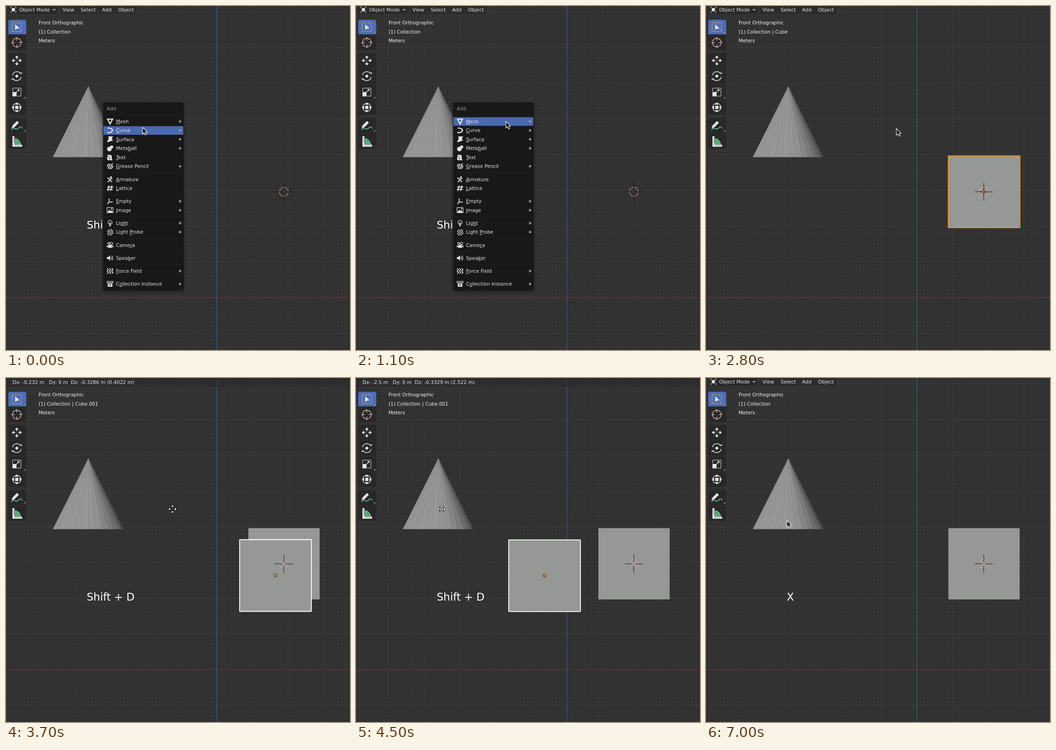
An HTML page for the animation above (7.2 s loop, 748 px wide and 748 px high).

```html
<!DOCTYPE html>
<html lang="en">
<head>
<meta charset="utf-8">
<title>Add, duplicate, delete</title>
<style>
html, body { margin: 0; width: 100%; height: 100%; overflow: hidden; background: #313131; }
svg { display: block; width: 100vw; height: 100vh; }
text { font: 10.5px "DejaVu Sans", sans-serif; fill: #e4e4e4; white-space: pre; }
.head text { font-size: 10.6px; }
.info text { font-size: 10.4px; fill: #f2f2f2; }
.keys text { font-size: 23px; fill: #fff; }
.dim { fill: #9a9a9a; }
.u { text-decoration: underline; text-decoration-thickness: 1px; text-underline-offset: 2px; }
.menu { filter: drop-shadow(0 2px 3px rgba(0, 0, 0, .45)); }
.panel { fill: #181818; fill-opacity: .97; }
.hi { fill: #4a69af; }
.icon { fill: none; stroke: #e4e4e4; stroke-width: 1.2; }
.icon .f { fill: #e4e4e4; stroke: none; }
.icon .k { fill: #181818; stroke: none; }
.tool { fill: #282828; }
.corner { fill: #888; }
</style>
</head>
<body>
<svg id="stage" viewBox="0 0 748 748" xmlns="http://www.w3.org/2000/svg">
  <rect width="748" height="748" fill="#313131"/>
  <path id="minor" stroke="#363636"/>
  <path id="major" stroke="#3f3f3f"/>
  <path d="M0 633.5H748" stroke="#853447"/>
  <path d="M458.5 0V748" stroke="#2f62a9" stroke-width="1.3"/>
  <g id="cone"></g>

  <g id="cube"><rect x="527" y="326.5" width="155" height="155" fill="#969896"/></g>
  <rect id="cubeLine" x="526.7" y="326" width="156" height="156" rx="1" fill="none" stroke="#f5920d" stroke-width="1.8"/>
  <g id="copy">
    <rect id="copyBox" x="-78" y="-78" width="156" height="156" rx="1" fill="#969896" stroke-width="1.8"/>
    <circle r="3" fill="#f09a1c" stroke="#111"/>
  </g>
  <g transform="translate(604 404)" fill="none">
    <circle r="9.6" stroke="#e8dcd8"/>
    <circle r="9.6" stroke="#c8402f" stroke-dasharray="3.77"/>
    <path d="M-19.5 0H-4.5M4.5 0H19.5M0-19.5V-4.5M0 4.5V19.5" stroke="#111"/>
    <g id="cubeDot"><path d="M-6 0H6M0-6V6" stroke="#111"/><circle r="3" fill="#f08a2c" stroke="#111"/></g>
  </g>

  <g class="head" id="head">
    <rect x="6" y="-6" width="105" height="23" rx="4" fill="#282828"/>
    <rect x="118" y="-6" width="166" height="23" rx="4" fill="#2c2c2c"/>
    <rect x="12.5" y="4.5" width="7" height="7" fill="#e4e4e4"/>
    <path d="M10 5V2H13M19 2H22V5M22 11V14H19M13 14H10V11" fill="none" stroke="#ccc"/>
    <path d="M101.500 6.500L104.500 9.500L107.500 6.500" fill="none" stroke="#ccc" stroke-width="1.3"/>
    <text x="28.500" y="12">Object Mode</text><text x="123" y="12">View</text>
    <text x="162.500" y="12">Select</text><text x="209" y="12">Add</text><text x="243.500" y="12">Object</text>
  </g>
  <g class="head" id="move"><rect width="748" height="19" fill="#292929" opacity=".6"/><text id="delta" x="14" y="13"></text></g>
  <g class="info"><text x="71" y="40.300">Front Orthographic</text><text id="label" x="71" y="59.800"></text><text x="71" y="79.300">Meters</text></g>

  <g id="tools">
    <path class="tool" d="M9 30H40Q44 30 44 34V92Q44 96 40 96H9Q5 96 5 92V34Q5 30 9 30ZM9 102H40Q44 102 44 106V233Q44 237 40 237H9Q5 237 5 233V106Q5 102 9 102ZM9 244H40Q44 244 44 248V307Q44 311 40 311H9Q5 311 5 307V248Q5 244 9 244Z"/>
    <path d="M5 62.500H44M5 135.500H44M5 169.500H44M5 203.500H44M5 277.500H44" stroke="#313131"/>
    <path d="M9 30H40Q44 30 44 34V61.500H5V34Q5 30 9 30Z" fill="#4c6fb6"/>
    <rect x="13.500" y="36.500" width="20" height="19" fill="none" stroke="#eba53c" stroke-width="1.500" stroke-dasharray="4 2.500"/>
    <path d="M20 40V52L23 49.500L29.500 48.500Z" fill="#eee"/>
    <g fill="none" transform="translate(23.500 79.500)">
      <circle r="9.500" stroke="#eee" stroke-width="1.400"/>
      <circle r="9.500" stroke="#c9443c" stroke-width="1.400" stroke-dasharray="3.730"/>
      <path d="M-12 0H-4M4 0H12M0-12V-4M0 4V12" stroke="#ddd"/>
    </g>
    <g fill="#e4e4e4" stroke="#e4e4e4" transform="translate(23.500 118.500)">
      <path d="M-8 0H-3M3 0H8M0-8V-3M0 3V8" stroke-width="1.600"/>
      <path stroke="none" d="M0-11L4-6H-4ZM0 11L4 6H-4ZM-11 0L-6-4V4ZM11 0L6-4V4Z"/>
    </g>
    <g fill="none" stroke="#e4e4e4" stroke-width="1.500" transform="translate(23.500 152.500)">
      <path d="M-9.500-2A9.700 9.700 0 0 1 8-5.500M9.500 2A9.700 9.700 0 0 1-8 5.500"/>
      <path d="M0-4L4 0L0 4L-4 0ZM6-5H11V-9ZM-6 5H-11V9Z" fill="#e4e4e4" stroke="none"/>
    </g>
    <path d="M15 178.500H32.500V196H24M14.500 186V178.500" fill="none" stroke="#ddd"/>
    <path d="M14 187H23V196.500H14Z" fill="#e4e4e4"/><path d="M23 187L28 182M25 181.500H28.500V185" fill="none" stroke="#e4e4e4" stroke-width="1.500"/>
    <g transform="translate(23.500 220.500)" fill="#e4e4e4">
      <circle r="9" fill="none" stroke="#ddd" stroke-width="1.300"/><path d="M-3.500-3.500H3.500V3.500H-3.500Z"/>
      <path d="M0-11L4-6H-4ZM0 11L4 6H-4ZM-11 0L-6-4V4ZM11 0L6-4V4Z"/>
    </g>
    <path d="M12 270C17 260 22 272 27 266S33 264 36 266" fill="none" stroke="#69c88b" stroke-width="1.500"/>
    <path d="M12 266L14 260L24 250L28 254L18 264Z" fill="#e4e4e4"/>
    <path d="M20 288A14 14 0 0 1 32 301H20Z" fill="#56a779" stroke="#7bd39f"/>
    <path d="M14 283H18.500V301.500H35V306H14Z" fill="#e4e4e4"/>
    <path d="M16 287H18M16 291H18M16 295H18M22 304V302M26 304V302M30 304V302" stroke="#444"/>
    <path class="corner" d="M42 56V60H38ZM42 197V201H38ZM42 269V273H38Z"/>
  </g>

  <g class="keys"><text id="key1" x="175.500"></text><text id="key2" x="175.500" y="484.300">X</text></g>
  <g class="menu" id="add"></g>
  <g class="menu" id="mesh"></g>
  <g class="menu" id="curve"></g>
  <g class="menu" id="ask">
    <rect class="panel" x="97" y="268.500" width="175" height="54.500" rx="4"/>
    <path d="M98 296.500H271" stroke="#202020"/>
    <rect class="hi" x="98" y="301" width="173" height="18.700"/>
    <circle cx="110.500" cy="282.500" r="6.500" fill="none" stroke="#aaa"/>
    <text class="dim" x="107.700" y="286.500">?</text><text class="dim" x="128.500" y="286">OK?</text>
    <text x="125" y="314.200"><tspan class="u">D</tspan>elete</text><text class="dim" x="259.500" y="314.200">X</text>
  </g>
  <path id="arrow" d="M0 0V14.500L3.400 11.300L5.800 16.500L8.400 15.300L6 10.300H10.300Z" fill="#0c0c0c" stroke="#fff" stroke-width="1.100" stroke-linejoin="round"/>
  <path id="cross" d="M0-9L4-4.500H-4ZM0 9L4 4.500H-4ZM-9 0L-4.500-4V4ZM9 0L4.500-4V4Z" fill="#fff" stroke="#111" stroke-width="1"/>
</svg>
<script>
const LOOP = 7200, STEP = 100, UNIT = 77.6, ROW = 19.5, GAP = 8.7;
const $ = id => document.getElementById(id);
const path = (d, extra = '') => `<path d="${d}" ${extra}/>`;
const solid = d => path(d, 'class="f"');
const dot = (x, y, r, cls = '') => `<circle cx="${x}" cy="${y}" r="${r}" class="${cls}"/>`;

const icons = {
  mesh: path('M-5.500-5H5.500L0 5.500Z', 'stroke-width="2.500"'),
  curve: path('M-5-5C2-6 6-2 5 1S-1 5.500-6 4.500', 'stroke-width="2.400"'),
  surface: solid('M-4-6.500H6.500Q2-1 6.500 3Q3 3 1 4T-6.500 6.500L-5 2Q-2 0-4-6.500Z'),
  meta: dot(-1.5, 1.5, 5, 'f') + dot(3.5, -3, 3.3, 'f'),
  text: '<text x="-7" y="6" style="font:bold 20px \'Noto Serif\',serif">a</text>',
  grease: path('M-6 1C-5-6 0-6-1-2S-6 4-3 5S2-2 5-1S3 5 1 6M1-2L6-6', 'stroke-width="1.800"'),
  bones: dot(2, -4.5, 2, 'f') + path('M-6-3L-2-1H5M0-1L-1 2L-5 6M0 2L4 6', 'stroke-width="2"'),
  lattice: path('M-2-6L-5 6M4-6L1 6M-6-2.500H7M-7 2.500H6', 'stroke-width="1.900"'),
  empty: path('M-2-6V2H6M-2 2L-6 6', 'stroke-width="1.800"'),
  image: path('M-6.500-5.500H6.500V5.500H-6.500Z') + solid('M-6 5L-2-1L1 2L3 0L6 5Z') + dot(3, -2.5, 1.3, 'f'),
  light: dot(0, -1.5, 4.5) + path('M-2-1L0 1L2-1M0 1V3M-2 4.500H2M-1.500 6.500H1.500', 'stroke-width="1.500"'),
  probe: path('M-6-1L-1-6M-6 4L4-6M-4 7L7-4M1 7L7 1', 'stroke-width="1.800" stroke-dasharray="4 1"'),
  camera: dot(-3, -3.5, 2.2) + dot(3, -3.5, 2.8) + solid('M-4 0H4V6H-4ZM4 3L7 0V6ZM-7 1L-4 2V4L-7 5Z'),
  speaker: solid('M-7-2H-4L0-6V6L-4 2H-7Z') + path('M2-3Q4 0 2 3M4-5.500Q8 0 4 5.500'),
  force: [-5, 0, 5].map(x => path(`M${x - 1.5}-6L${x + 1.5}-3L${x - 1.5} 0L${x + 1.5} 3L${x - 1.5} 6`, 'stroke-width="1.600"')).join(''),
  box: path('M-6.500-5.500H6.500V-2.500H-6.500Z') + solid('M-5-1H5V6H-5Z') + path('M-2 1H2V3H-2Z', 'class="k"'),
  plane: path('M-6-6H6V6H-6Z'),
  cube: path('M-6.500-3H3V6.500H-6.500ZM-6.500-3L-3-6.500H6.500V3L3 6.500M3-3L6.500-6.500'),
  circle: dot(0, 0, 6.5),
  uv: dot(0, 0, 6.5) + path('M-6.500 0H6.500M0-6.500V6.500M-6 1Q0 4 6 1', 'stroke-width=".9"'),
  ico: path('M0-6.500L6-3V3L0 6.500L-6 3V-3ZM0-3L4 3H-4ZM0-6.500V-3M6 3H4M-6 3H-4M-6-3L0-3L6-3', 'stroke-width=".9"'),
  cylinder: path('M-5-4V4C-5 7.500 5 7.500 5 4V-4C5-7.500-5-7.500-5-4C-5-1 5-1 5-4'),
  cone: path('M0-6.500L6 3.500C5 7-5 7-6 3.500Z'),
  torus: '<ellipse rx="7" ry="4.800"/><ellipse cy="-.500" rx="3" ry="1.300"/>',
  grid: path('M-6-6H6V6H-6ZM-2-6V6M2-6V6M-6-2H6M-6 2H6'),
  monkey: path('M-4 1C-8 1-8-4-4.500-3C-4-7 4-7 4.500-3C8-4 8 1 4 1L2.500 6H-2.500ZM-4-1Q-2-3 0-1Q2-3 4-1'),
  bezier: path('M-6 5C-6-7 6 7 6-5', 'stroke-width="1.500"'),
  trail: path('M-6 4L-2-3L2 3L6-4', 'stroke-width="1.500"')
};

// Item: icon, label with _ before its access key, trailing > for a submenu; '-' is a separator.
const addItems = ['mesh _Mesh>', 'curve _Curve>', 'surface _Surface>', 'meta Meta_ball>', 'text _Text', 'grease _Grease Pencil>', '-',
  'bones _Armature', 'lattice _Lattice', '-', 'empty _Empty>', 'image _Image>', '-', 'light Lig_ht>', 'probe Light _Probe>', '-',
  'camera Came_ra', '-', 'speaker Spea_ker', '-', 'force _Force Field>', '-', 'box C_ollection Instance>'];
const meshItems = ['plane _Plane', 'cube _Cube', 'circle Ci_rcle', 'uv _UV Sphere', 'ico _Ico Sphere', 'cylinder C_ylinder',
  'cone C_one', 'torus _Torus', '-', 'grid _Grid', 'monkey _Monkey'];
const curveItems = ['bezier _Bezier', 'circle _Circle', '-', 'bezier _Nurbs Curve', 'circle C_ircle', 'trail _Path'];

function buildMenu(id, items, x, first, title) {
  const w = title ? 175.5 : 173.5, top = first - (title ? 41.5 : 12.5);
  let y = first, rows = '';
  for (const item of items) {
    if (item === '-') {
      rows += path(`M${x + 1} ${y - ROW / 2 + GAP / 2}h${w - 2}`, 'stroke="#202020"');
      y += GAP;
      continue;
    }
    const [, icon, label, sub] = item.match(/^(\w+) ([^>]+)(>?)$/);
    rows += `<g class="icon" transform="translate(${x + (title ? 15.3 : 14.3)} ${y})">${icons[icon]}</g>` +
      `<text x="${x + (title ? 28.2 : 27.2)}" y="${y + 3.8}">${label.replace(/_(.)/, '<tspan class="u">$1</tspan>')}</text>`;
    if (sub) rows += path(`M${x + 165.5} ${y - 3.5}l6 3.500l-6 3.500Z`, 'fill="#969696"');
    y += ROW;
  }
  const head = title ? `<text class="dim" x="${x + 8}" y="${first - 24.5}">${title}</text>` +
    path(`M${x + 1} ${first - 14}h${w - 2}`, 'stroke="#202020"') : '';
  $(id).innerHTML = `<rect class="panel" x="${x}" y="${top}" width="${w}" height="${y - ROW / 2 + 4 - top}" rx="4"/>${head}` +
    `<rect class="hi" x="${x + 1}" width="${w - 2}" height="18.700"/>${rows}`;
  return $(id).querySelector('.hi');
}

function gridPath(step, skip) {
  let d = '';
  for (let i = -90; i <= 90; i++) {
    if (skip && i % skip === 0) continue;
    const x = Math.round(458 + i * step) + .5, y = Math.round(633 + i * step) + .5;
    if (x > 0 && x < 748) d += `M${x} 0V748`;
    if (y > 0 && y < 748) d += `M0 ${y}H748`;
  }
  return d;
}

function coneFacets() {
  const edge = k => 179.5 - UNIT * Math.cos(Math.PI * k / 16);
  let out = '';
  for (let k = 0; k < 16; k++) {
    const u = (k + .5) / 16;
    const v = Math.round(150 - 105 * Math.max(0, 2 * u - 1) ** 1.6 + (k % 2 ? 1 : -1));
    const fill = `rgb(${v},${v},${v + 1})`;
    out += path(`M179.500 174.500L${edge(k)} 328.500H${edge(k + 1)}Z`, `fill="${fill}" stroke="${fill}" stroke-width=".3"`);
  }
  return out;
}

$('minor').setAttribute('d', gridPath(UNIT / 10, 10));
$('major').setAttribute('d', gridPath(UNIT));
$('cone').innerHTML = coneFacets();
const addHi = buildMenu('add', addItems, 211, 251, 'Add');
const meshHi = buildMenu('mesh', meshItems, 387, 250.5);
const curveHi = buildMenu('curve', curveItems, 387, 270);
curveHi.remove();

// Pointer path: time, x, y
const track = [[0, 297, 264], [300, 297, 264], [700, 306, 255], [1100, 326, 251], [1500, 378, 251], [1800, 414, 266.5],
  [3300, 414, 266.5], [3500, 380, 259.5], [3700, 362, 285], [3900, 325, 319], [4100, 297.23, 315.004], [4300, 242, 303],
  [4600, 158, 276.5], [4900, 158, 276.5], [5200, 176, 310], [LOOP, 176, 310]];

function pointerAt(t) {
  const i = track.findIndex(p => p[0] > t), [t0, x0, y0] = track[i - 1], [t1, x1, y1] = track[i];
  const k = (t - t0) / (t1 - t0);
  return [x0 + (x1 - x0) * k, y0 + (y1 - y0) * k];
}

const show = (id, on) => { $(id).style.display = on ? '' : 'none'; };
const place = (id, x, y) => $(id).setAttribute('transform', `translate(${x} ${y})`);
const num = v => String(+v.toPrecision(4));
const fade = (t, from, to) => Math.min(1, Math.max(0, (to - t) / (to - from)));

function render(t) {
  const [x, y] = pointerAt(t);
  const menu = t < 1900, moving = t >= 3500 && t < 4700, copied = t >= 3500 && t < 6000;
  const onMesh = y < 260.7 || t >= 1200;

  show('add', menu);
  addHi.setAttribute('y', (onMesh ? 251 : 270.5) - 9.2);
  show('curve', t >= 100 && menu && !onMesh);
  show('mesh', t >= 1200 && menu);
  meshHi.style.display = x > 387 ? '' : 'none';
  meshHi.setAttribute('y', (y < 260.2 ? 250.5 : 270) - 9.2);

  const picked = t >= 1900 && t < 3500;
  show('cube', !menu);
  show('cubeLine', picked);
  show('cubeDot', picked);
  show('copy', copied);
  const [dx, dy] = moving ? [x - 380, y - 259.5] : [-222, 17];
  place('copy', 604 + dx, 404 + dy);
  $('copyBox').setAttribute('stroke', moving ? '#fff' : '#f0941c');

  show('head', !moving);
  show('move', moving);
  const mx = dx / UNIT, mz = -dy / UNIT;
  $('delta').textContent = `Dx: ${num(mx)} m   Dy: 0 m  Dz: ${num(mz)} m (${num(Math.hypot(mx, mz))} m)`;
  $('label').textContent = '(1) Collection' + (picked ? ' | Cube' : copied ? ' | Cube.001' : '');

  const later = t >= 3500, second = t >= 5400;
  $('key1').textContent = later ? 'Shift + D' : 'Shift + A';
  $('key1').setAttribute('y', second ? 460 : 484.3);
  $('key1').style.opacity = later ? fade(t, 6300, 6700) : fade(t, 2300, 2500);
  show('key2', second);
  show('ask', second && t < 6000);

  show('arrow', !moving);
  show('cross', moving);
  place('arrow', x, y);
  place('cross', x, y);
}

const start = performance.now();
function tick() {
  const t = (performance.now() - start) % LOOP;
  render(Math.floor(t / STEP) * STEP);
  requestAnimationFrame(tick);
}
tick();
</script>
</body>
</html>
```
